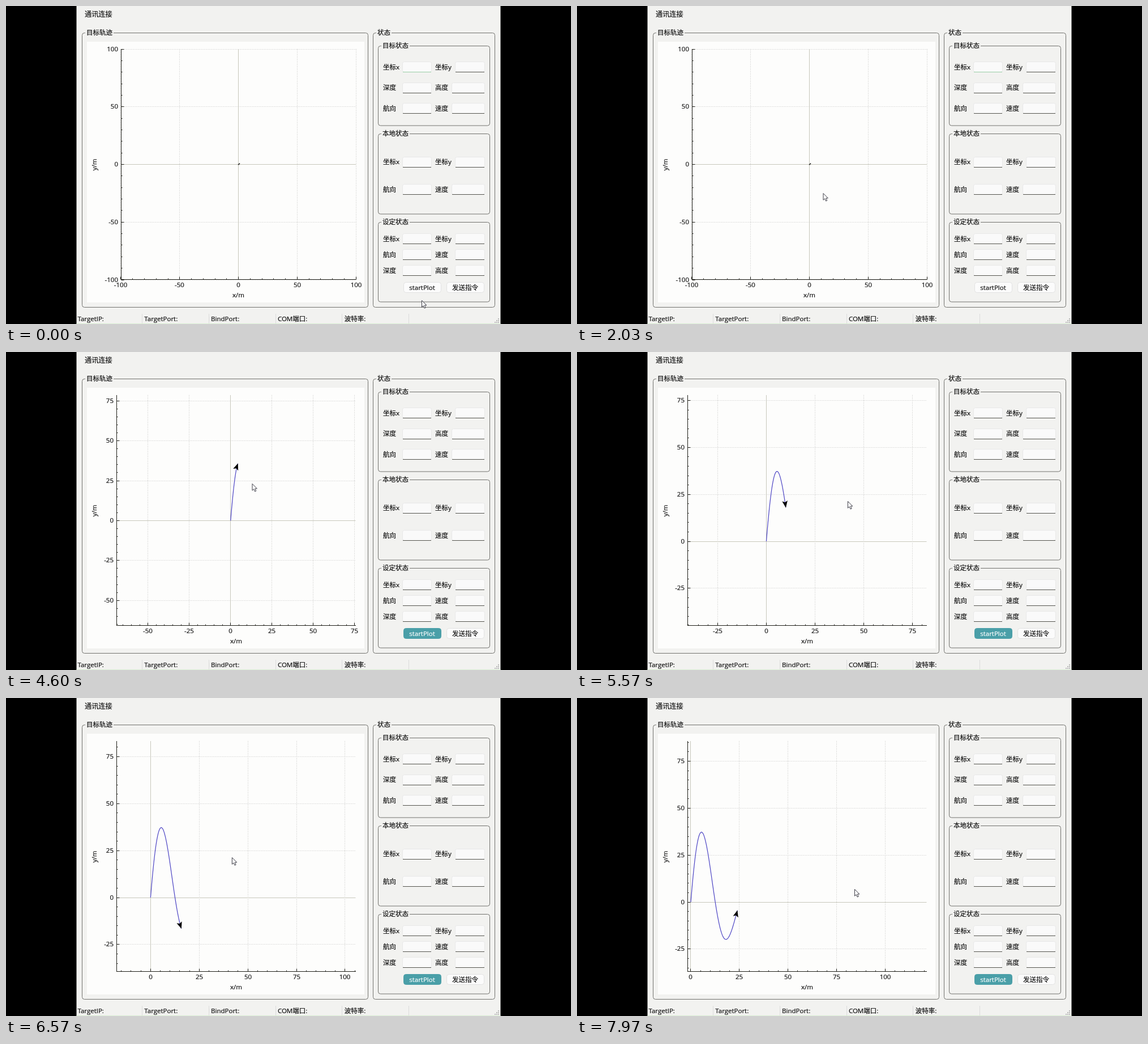
Animation of 998x561 px, one loop 8 s. Source, as an HTML page:

```html
<!DOCTYPE html>
<html lang="zh-CN">
<head>
<meta charset="utf-8">
<title>目标轨迹</title>
<style>
  html, body { margin: 0; width: 100%; height: 100%; overflow: hidden; background: #000; }
  svg { display: block; width: 998px; height: 561px; }
  text {
    font: 11.5px "Open Sans", "Noto Sans CJK SC", "Noto Sans CJK", sans-serif;
    color: #101010; fill: currentColor; stroke: currentColor; stroke-width: .2px;
  }
  .box { fill: none; stroke: #72726e; }
  .grid { stroke: #c2c2c0; stroke-dasharray: 1 2; }
  .zero { stroke: #c8c8bc; }
  .axis { stroke: #1e1e18; }
</style>
</head>
<body>
<svg id="stage" viewBox="0 0 998 561">
  <defs><clipPath id="area"><rect id="areaRect" y="76" height="407"/></clipPath></defs>
  <rect x="124.5" width="749" height="561" fill="#f2f2f0"/>
  <rect x="124.5" y="560" width="749" height="1" fill="#d9efd2"/>
  <g id="ui"></g>
  <rect x="143" y="63" width="490" height="460" fill="#fdfdfc"/>
  <g id="axes"></g>
  <g clip-path="url(#area)">
    <path id="curve" fill="none" stroke="#4c44c4" stroke-width="1.2"/>
    <path id="arrow"/>
  </g>
  <path id="seed" d="M410 280.2L413 277.6" stroke="#222" stroke-width="1.5"/>
  <path id="cursor" d="M0 0V11.8L2.7 9.3L4.6 13.6L6.7 12.7L4.8 8.5H8.4Z" fill="#fff" stroke="#3c3c46"/>
</svg>
<script>
const LOOP = 8000, TOP = 76, BOTTOM = 483;
const PRESS = 3480, RELEASE = 3680, PLOT_START = 3845;
const ZOOMS = [4400, 4500, 4760];
const GRAB = { t: 5100, x: 533.5, y: 238 }, DROP = 6950;

// time, x, y, linear approach
const PATH = [
  [0, 734, 519], [300, 734, 519], [1700, 434.5, 330], [2300, 434.5, 330],
  [3400, 729, 495], [3680, 729, 495], [4340, 434.5, 232], [4780, 434.5, 232],
  [5100, 533.5, 238], [5570, 478, 263, 1], [6570, 399, 281, 1],
  [6950, 344.5, 289, 1], [7900, 490, 337], [8000, 490, 337]
];

const $ = id => document.getElementById(id);
const line = (x1, y1, x2, y2, cls) =>
  `<line x1="${x1}" y1="${y1}" x2="${x2}" y2="${y2}" class="${cls}"/>`;
const text = (x, y, s, anchor = 'start', extra = '') =>
  `<text x="${x}" y="${y + 4}" text-anchor="${anchor}" ${extra}>${s}</text>`;

function group(x, y, right, bottom, title, titleWidth) {
  return `<rect class="box" x="${x + .5}" y="${y + .5}" width="${right - x}" height="${bottom - y}" rx="4"/>` +
    `<rect x="${x + 6}" y="${y - 1}" width="${titleWidth + 4}" height="3" fill="#f2f2f0"/>` +
    text(x + 8, y, title);
}

function field(x, right, y, id = '') {
  const base = Math.floor(y + 9) + .5;
  return `<rect x="${x + .5}" y="${base - 18}" width="${right - x}" height="18" rx="3" fill="#fafafa" stroke="#e8e8e8"/>` +
    `<path id="${id}" d="M${x + 1} ${base}H${right}" stroke="#55554f"/>`;
}

function row(y, left, right, rightX, id) {
  return text(666, y, left) + field(700, 751, y, id) + text(758, y, right) + field(rightX, 845, y);
}

function button(x, s, id) {
  return `<g id="${id}"><rect x="${x + .5}" y="487.5" width="66" height="18" rx="4" fill="#fbfbfb" stroke="#e2e2e2"/>` +
    text(x + 33, 496.5, s, 'middle') + '</g>';
}

function buildUi() {
  let s = text(139, 15, '通讯连接', 'start', 'style="font-size:12.2px"');
  s += group(134, 47, 639, 531, '目标轨迹', 46) + group(648, 47, 863, 531, '状态', 23);
  s += group(657, 70, 854, 210.5, '目标状态', 46) + group(657, 225, 854, 366.5, '本地状态', 46);
  s += group(657, 381, 854, 521.5, '设定状态', 46);
  s += row(107.5, '坐标x', '坐标y', 793, 'focusLine') + row(144, '深度', '高度', 787) + row(180.5, '航向', '速度', 787);
  s += row(275, '坐标x', '坐标y', 793) + row(323.5, '航向', '速度', 787);
  s += row(410.5, '坐标x', '坐标y', 793) + row(438.5, '航向', '速度', 793) + row(466.5, '深度', '高度', 793);
  s += button(702, 'startPlot', 'start') + button(778, '发送指令', 'send');
  ['TargetIP:', 'TargetPort:', 'BindPort:', 'COM端口:', '波特率:'].forEach((name, i) => {
    s += text(126.5 + 117.8 * i, 551.5, name);
    s += `<path d="M${Math.round(240 + 117.8 * i) + .5} 543V560" stroke="#dcdcdc"/>`;
  });
  for (let r = 0; r < 3; r++)
    for (let c = 0; c <= r; c++)
      s += `<rect x="${869 - 3 * c}" y="${551 + 3 * r}" width="2" height="2" fill="#b8b8b8"/>`;
  $('ui').innerHTML = s;
}

function cursorAt(t) {
  let i = 1;
  while (i < PATH.length - 1 && PATH[i][0] < t) i++;
  const [t0, x0, y0] = PATH[i - 1], [t1, x1, y1, linear] = PATH[i];
  let k = Math.min(1, (t - t0) / (t1 - t0));
  if (!linear) k = k * k * (3 - 2 * k);
  return { x: x0 + (x1 - x0) * k, y: y0 + (y1 - y0) * k };
}

function viewAt(t) {
  const n = ZOOMS.filter(z => t >= z).length;
  if (!n) return { left: 203, right: 618, ox: 410.5, oy: 279.5, sx: 2.075, sy: 2.035, step: 50 };
  const k = .85 ** n, sx = 2.11 / k, sy = 2.035 / k;
  const v = { left: 195.5, right: 617.5, ox: 435 - 13.1 * sx, oy: 232 + 23.25 * sy, sx, sy, step: 25 };
  if (t > GRAB.t) {
    const c = cursorAt(Math.min(t, DROP));
    v.ox += c.x - GRAB.x;
    v.oy += c.y - GRAB.y;
  }
  return v;
}

const snap = p => Math.floor(p) + .5;

function drawAxes(v) {
  const { left, right, ox, oy, sx, sy, step } = v;
  const l = snap(left), b = snap(BOTTOM - .5), sub = step / 5;
  let grid = '', ticks = '';
  for (let i = Math.ceil((left - ox) / sx / sub - .01); i * sub <= (right - ox) / sx + .3; i++) {
    const x = snap(ox + i * sub * sx), major = i % 5 === 0;
    ticks += line(x, b, x, b - (major ? 5 : 2), 'axis');
    if (!major) continue;
    grid += line(x, TOP, x, b, i ? 'grid' : 'zero');
    ticks += text(x, 492, i * sub, 'middle');
  }
  for (let i = Math.ceil((oy - BOTTOM) / sy / sub - .01); i * sub <= (oy - TOP) / sy + .3; i++) {
    const y = snap(oy - i * sub * sy), major = i % 5 === 0;
    ticks += line(l, y, l + (major ? 5 : 2), y, 'axis');
    if (!major) continue;
    grid += line(l, y, right, y, i ? 'grid' : 'zero');
    ticks += text(l - 5.5, y - .5, i * sub, 'end');
  }
  const mid = (left + right) / 2;
  $('axes').innerHTML = grid + line(l, TOP, l, b + .5, 'axis') + line(l, b, right + .5, b, 'axis') + ticks +
    text(mid, 510, 'x/m', 'middle') + text(0, 0, 'y/m', 'middle', 'transform="translate(155.5 280) rotate(-90)"');
}

const wave = x => 50 * Math.exp(-.05 * x) * Math.sin(x / 4);

function drawTrack(t, v) {
  const end = (t - PLOT_START) * .0058, on = end > 0;
  $('seed').style.display = on ? 'none' : '';
  $('curve').style.display = $('arrow').style.display = on ? '' : 'none';
  if (!on) return;
  const at = x => [v.ox + x * v.sx, v.oy - wave(x) * v.sy];
  const pts = [];
  for (let x = 0; x < end; x += .2) pts.push(at(x));
  const tip = at(end), back = at(end - .05);
  pts.push(tip);
  $('curve').setAttribute('d', 'M' + pts.map(p => p.map(c => c.toFixed(2)).join(' ')).join('L'));
  const angle = Math.atan2(tip[1] - back[1], tip[0] - back[0]) * 180 / Math.PI;
  $('arrow').setAttribute('d', 'M.5 0L-11.5 4.8L-9 0L-11.5 -4.8Z');
  $('arrow').setAttribute('transform', `translate(${tip}) rotate(${angle})`);
  $('areaRect').setAttribute('x', v.left);
  $('areaRect').setAttribute('width', v.right - v.left);
}

function drawButton(t) {
  const [face, label] = $('start').children;
  const pressed = t >= PRESS && t < RELEASE, active = t >= RELEASE;
  face.style.fill = active ? '#4a9fa8' : pressed ? '#f4f4f4' : '#fbfbfb';
  face.style.stroke = active ? '#4a9fa8' : '#e2e2e2';
  label.style.color = active ? '#fff' : pressed ? '#858585' : '#101010';
  $('focusLine').style.stroke = t < PRESS ? '#98cfa6' : '#55554f';
}

let shown = '';
function render(t) {
  const v = viewAt(t), key = JSON.stringify(v), c = cursorAt(t);
  if (key !== shown) drawAxes(v);
  shown = key;
  drawTrack(t, v);
  drawButton(t);
  $('cursor').setAttribute('transform', `translate(${c.x + .5} ${c.y + .5})`);
}

buildUi();
const began = performance.now();
(function tick() {
  render((performance.now() - began) % LOOP);
  requestAnimationFrame(tick);
})();
</script>
</body>
</html>
```
